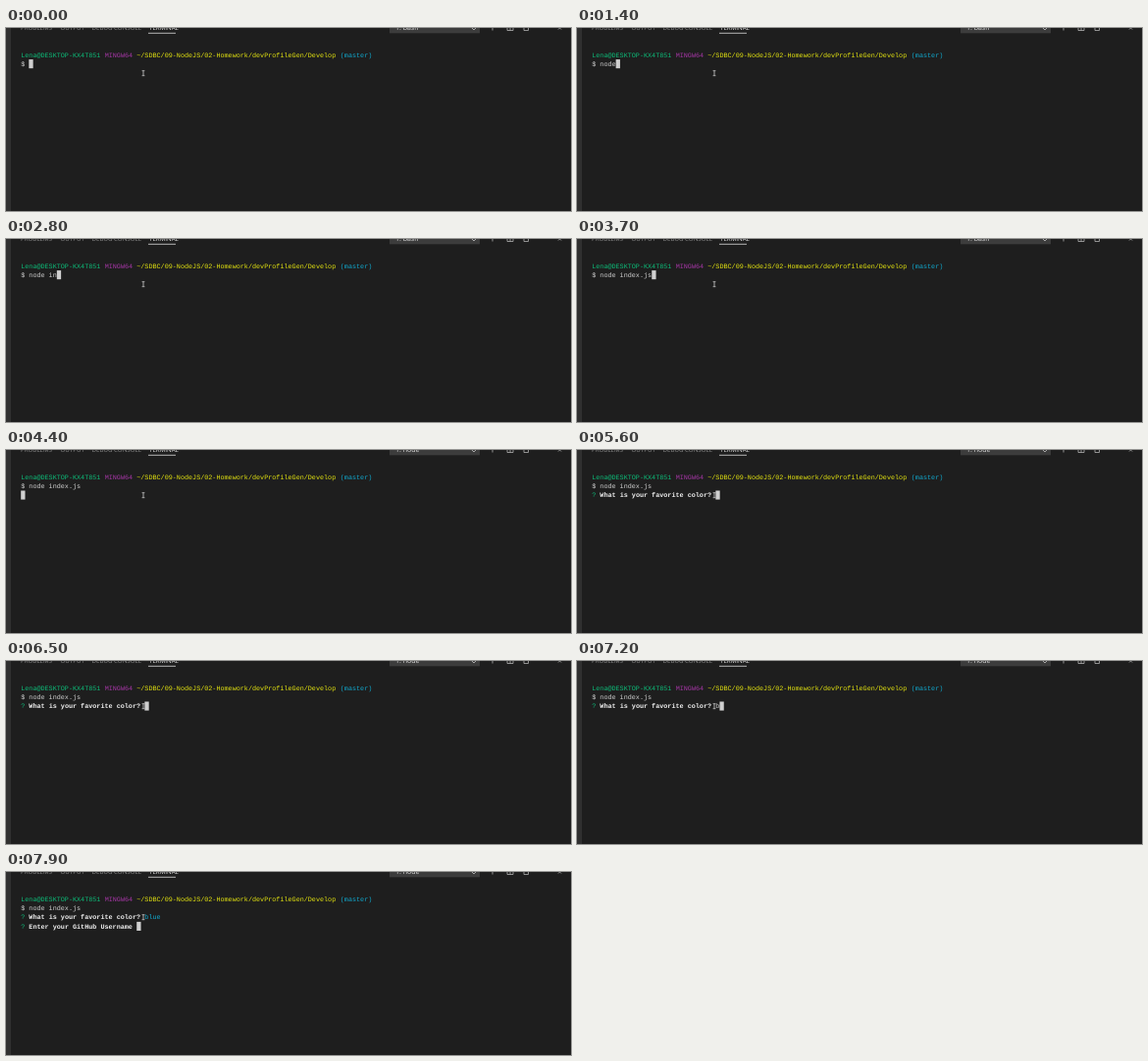
An HTML page with a canvas for the animation above (8 s loop, 576 px wide and 187 px high).

```html
<!DOCTYPE html>
<html lang="en">
<head>
<meta charset="utf-8">
<title>Terminal session</title>
<style>
  html, body { margin: 0; width: 100%; height: 100%; overflow: hidden; background: #1e1e1e; }
  canvas { display: block; }
</style>
</head>
<body>
<canvas id="stage" width="576" height="187"></canvas>
<script>
const ctx = document.getElementById('stage').getContext('2d');
const LOOP = 8000;
const LEFT = 15.2, CELL = 4.07, BASE = 29.6, ROW = 9.4;
const GREEN = '#0dbc79', PURPLE = '#a637a6', YELLOW = '#e5e510', CYAN = '#11a8cd', WHITE = '#d0d0d0';

// Time of each change and the text present from then on
const command = [[0, ''], [700, 'n'], [900, 'no'], [1000, 'nod'], [1200, 'node'], [1800, 'node '],
  [1900, 'node i'], [2500, 'node in'], [2900, 'node ind'], [3000, 'node inde'],
  [3100, 'node index'], [3200, 'node index.js']];
const answer = [[0, ''], [7200, 'b'], [7300, 'bl'], [7400, 'blu'], [7500, 'blue']];
const RUN = 4000, TITLE = 4200, ASK = 5300, SUBMIT = 7700;

const at = (steps, t) => steps.filter(([start]) => start <= t).pop()[1];

function rect(x, y, w, h, color) {
  ctx.fillStyle = color;
  ctx.fillRect(x, y, w, h);
}

function label(x, y, str, color, size = 6.2) {
  ctx.font = `${size}px "Open Sans", sans-serif`;
  ctx.fillStyle = color;
  ctx.fillText(str, x, y);
}

// Writes [text, color, bold] parts on a terminal row and returns the end column
function write(row, ...parts) {
  let col = 0;
  for (const [str, color, bold] of parts) {
    ctx.font = `${bold ? 'bold ' : ''}6.78px "Liberation Mono", monospace`;
    ctx.fillStyle = color;
    ctx.fillText(str, LEFT + col * CELL, BASE + row * ROW);
    col += str.length;
  }
  return col;
}

function cursor(row, col) {
  rect(LEFT + col * CELL, BASE + row * ROW - 6.9, 4.3, 9.1, '#d0d0d0');
}

function stroke(path, color) {
  ctx.strokeStyle = color;
  ctx.lineWidth = 0.8;
  ctx.stroke(new Path2D(path));
}

function panel(t) {
  rect(0, 0, 576, 187, '#1e1e1e');
  rect(0, 0, 5, 187, '#303030');
  label(15, 1.6, 'PROBLEMS', '#8a8a8a');
  label(55.5, 1.6, 'OUTPUT', '#8a8a8a');
  label(87.5, 1.6, 'DEBUG CONSOLE', '#8a8a8a');
  label(146, 1.6, 'TERMINAL', '#e0e0e0');
  rect(145, 4.8, 28, 0.9, '#c8c8c8');
  rect(391, 0, 92, 5.3, '#3c3c3c');
  label(397, 2, t < TITLE ? '1: bash' : '1: node', '#e0e0e0', 7);
  stroke('M475 0l2 2l2-2', '#c0c0c0');
  stroke('M496 0v2.5M511 0v2.5h6V0M514 0v2.5M528 0v2.5h4.5V0M563 1.5l1.5-1.5l1.5 1.5', '#b0b0b0');
}

function session(t) {
  write(0, ['Lena@DESKTOP-KX4T851 ', GREEN], ['MINGW64 ', PURPLE],
    ['~/SDBC/09-NodeJS/02-Homework/devProfileGen/Develop ', YELLOW], ['(master)', CYAN]);
  const end = write(1, ['$ ' + at(command, t), WHITE]);
  if (t < RUN) return cursor(1, end);
  if (t < ASK) return cursor(2, 0);

  const done = t >= SUBMIT;
  const col = write(2, ['? ', GREEN], ['What is your favorite color? ', '#f0f0f0', true],
    [at(answer, t), done ? CYAN : WHITE]);
  if (!done) return cursor(2, col);
  cursor(3, write(3, ['? ', GREEN], ['Enter your GitHub Username ', '#f0f0f0', true]));
}

function frame() {
  const t = performance.now() % LOOP;
  ctx.textRendering = 'geometricPrecision';
  panel(t);
  session(t);
  stroke('M138.6 43.7h2.8M140 43.7v5M138.6 48.7h2.8', '#c8c8c8');
  requestAnimationFrame(frame);
}
frame();
</script>
</body>
</html>
```
